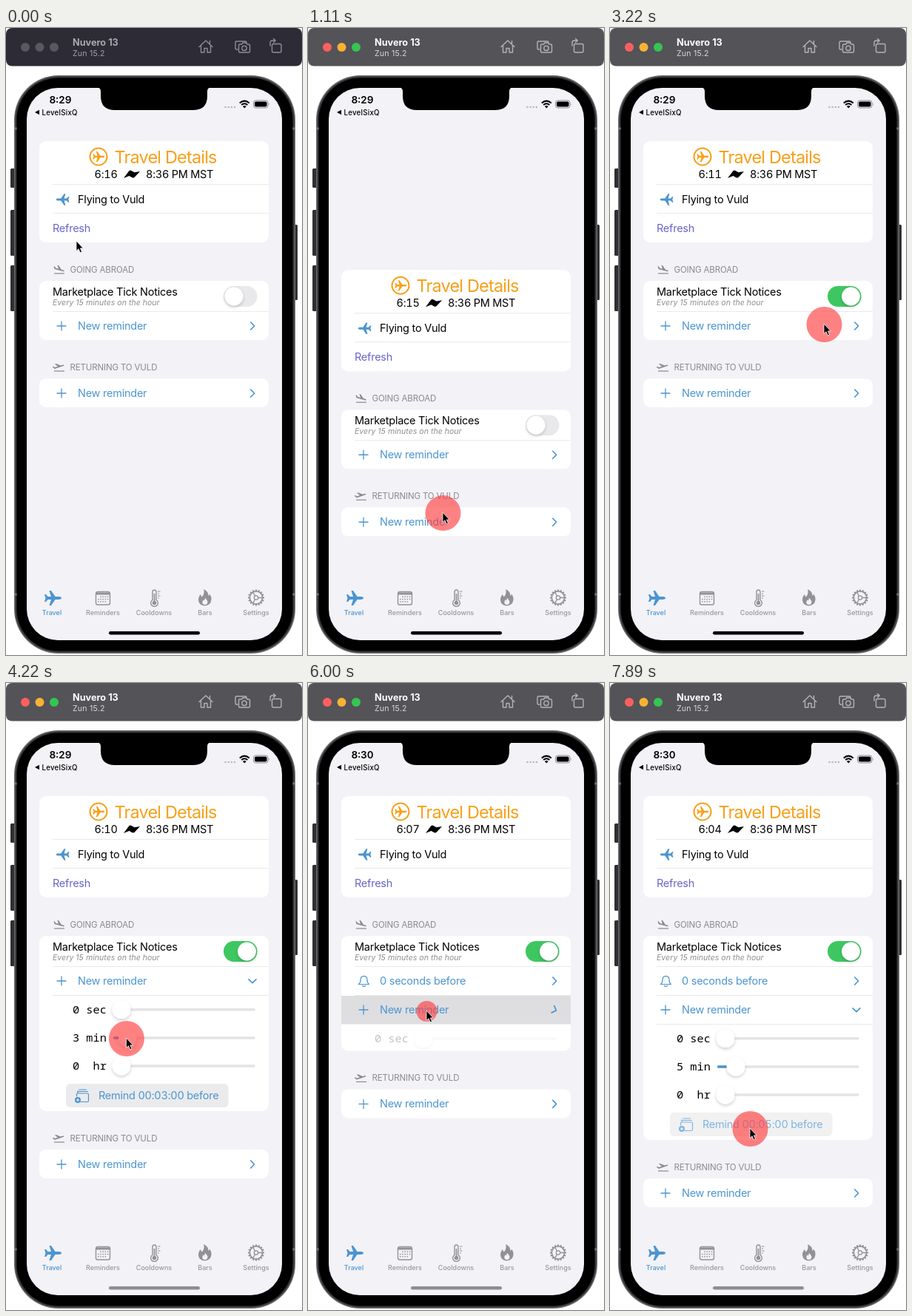
Write an HTML page that moves like this. It is 400x848 px and loops after 8 s.

```html
<!DOCTYPE html>
<html lang="en">
<head>
<meta charset="utf-8">
<title>Travel reminders</title>
<style>
html, body { margin: 0; width: 100%; height: 100%; overflow: hidden; background: #fff; }
svg { display: block; width: 400px; height: 848px; font-family: Inter, Roboto, sans-serif; }
text { white-space: pre; }
.body { font-size: 14.5px; letter-spacing: -.25px; }
.head { font-size: 11.5px; letter-spacing: -.15px; fill: #8a8a8e; }
.tab { font-size: 9px; font-weight: 500; text-anchor: middle; }
.mono { font: 15.3px "Noto Sans Mono", "DejaVu Sans Mono", monospace; }
.num { font-feature-settings: "tnum"; }
.blue { fill: #4c95d0; }
.line { fill: none; stroke-linecap: round; stroke-linejoin: round; }
.sep { stroke: #e9e9ec; stroke-width: 1; }
.card { fill: #fff; }
</style>
</head>
<body>
<svg id="stage" viewBox="0 0 400 848">
  <defs>
    <path id="plane" d="M12 0C12-1.4 9.6-1.9 8-1.9H3.5L-2-10H-4.5L-2-1.9H-6.5L-9-5H-11L-9.5 0L-11 5H-9L-6.5 1.9H-2L-4.5 10H-2L3.5 1.9H8C9.6 1.9 12 1.4 12 0Z"/>
    <path id="jet" d="M-7-5.5l1.5.4 1 2.2 4 1.1-1.6-5 1.8.5 3.6 5.6 3.3.9c1.2.5.9 1.8-.5 1.5L-6-1.5z"/>
    <path id="plus" class="line" d="M-6 0H6M0-6V6" stroke="#4c95d0" stroke-width="1.3"/>
    <path id="chev" class="line" d="M-2.2-5L2.6 0L-2.2 5" stroke="#4c95d0" stroke-width="1.7"/>
    <filter id="soft" x="-50%" y="-50%" width="200%" height="200%">
      <feDropShadow dx="0" dy="2" stdDeviation="2.2" flood-color="#000" flood-opacity=".2"/>
    </filter>
    <clipPath id="screen"><rect x="28" y="81" width="345" height="747" rx="42"/></clipPath>
    <clipPath id="fold"><rect id="foldBox" x="45" y="342" width="310" height="80" rx="9"/></clipPath>
  </defs>

  <!-- window bar -->
  <rect id="bar" width="400" height="51.5" rx="8"/>
  <g id="lights"><circle cx="26" cy="26" r="6"/><circle cx="45.5" cy="26" r="6"/><circle cx="65" cy="26" r="6"/></g>
  <text id="device" x="90" y="24" font-size="12.7" font-weight="700">Nuvero 13</text>
  <text id="system" x="90" y="38" font-size="10.6" letter-spacing=".2">Zun 15.2</text>
  <g id="tools" class="line" stroke-width="1.4">
    <path d="M261 25.5L270 17L279 25.5M263.500 24V33H268V27.500H272V33H276.500V24M275.500 21V17.500"/>
    <path d="M313 29H311.500Q310 29 310 27.500V19.500Q310 18 311.500 18H323.500Q325 18 325 19.500"/>
    <path d="M316 22H318.500L320 20H324.500L326 22H328Q329.500 22 329.500 23.500V31.500Q329.500 33 328 33H316Q314.500 33 314.500 31.500V23.500Q314.500 22 316 22Z"/>
    <circle cx="322" cy="27.300" r="3.200"/>
    <rect x="359.500" y="21.500" width="12.500" height="11.500" rx="2"/>
    <path d="M357 24V20Q357 17 360 17H364M361.500 14.500L364.200 17L361.500 19.500"/>
  </g>

  <!-- phone -->
  <g fill="#2f2f31">
    <rect x="6" y="190" width="7" height="26" rx="1.500"/><rect x="6" y="246" width="7" height="62" rx="1.500"/>
    <rect x="6" y="321" width="7" height="62" rx="1.500"/><rect x="388" y="266" width="6" height="102" rx="1.500"/>
  </g>
  <rect x="11" y="64" width="380" height="782" rx="60" fill="#69696b"/>
  <rect x="12.500" y="65.500" width="377" height="779" rx="58.500" fill="#343436"/>
  <rect x="14.500" y="67.500" width="373" height="775" rx="56.500"/>
  <path d="M11 136H14.500M11 766H14.500M387.500 136H391M387.500 766H391" stroke="#77777a" stroke-width="3"/>
  <rect x="28" y="81" width="345" height="747" rx="42" fill="#f2f2f7"/>

  <g clip-path="url(#screen)">
    <g id="list">
      <rect class="card" x="45" y="153" width="310" height="137" rx="9"/>
      <circle cx="125" cy="174" r="11.500" fill="none" stroke="#f7a01b" stroke-width="2"/>
      <use href="#plane" transform="translate(125 174) scale(.7)" fill="#f7a01b"/>
      <text x="146.500" y="182.500" font-size="23.500" letter-spacing="-.83" fill="#f7a01b">Travel Details</text>
      <text id="timer" class="body num" x="119.500" y="203"></text>
      <path d="M159 203L166.500 193Q168 192 170 193.300L173.500 195.300L181 194L173.500 202Q172 203.200 170 202L166.500 200Z"/>
      <text class="body num" x="189" y="203">8:36 PM MST</text>
      <path class="sep" d="M63 211.500H355M63 250.500H355"/>
      <use href="#plane" class="blue" transform="translate(77 232) scale(-.77 .77)"/>
      <text class="body" x="97" y="237">Flying to Vuld</text>
      <text class="body" x="63" y="276" fill="#6765c9">Refresh</text>

      <use href="#jet" transform="translate(71.500 327.500)" fill="#8a8a8e"/>
      <path d="M65 332H79" stroke="#8a8a8e" stroke-width="1.200"/>
      <text class="head" x="86.500" y="331">GOING ABROAD</text>

      <g clip-path="url(#fold)">
        <rect class="card" x="45" y="342" width="310" height="400"/>
        <text class="body" x="63" y="362">Marketplace Tick Notices</text>
        <text x="63" y="375" font-size="10.600" font-style="italic" fill="#8f8f93">Every 15 minutes on the hour</text>
        <rect id="track" x="294" y="349" width="45.500" height="28" rx="14"/>
        <circle id="knob" cy="363" r="12.400" fill="#fff" filter="url(#soft)"/>
        <path class="sep" d="M63 383.500H355"/>
        <g id="saved">
          <g class="line" stroke="#4c95d0" stroke-width="1.200">
            <path d="M68.500 407.500Q71 405.500 71 401.500Q71 396.500 75.500 396.300Q80 396.500 80 401.500Q80 405.500 82.500 407.500ZM73.500 409.500Q75.500 411.300 77.500 409.500"/>
          </g>
          <text class="body blue" x="97" y="408">0 seconds before</text>
          <use href="#chev" x="333" y="403"/>
          <path class="sep" d="M63 422.500H355"/>
        </g>
        <g id="adder">
          <rect id="glow" x="45" y="-19" width="310" height="38.500" fill="#d6d6da"/>
          <use href="#plus" x="75"/>
          <text class="body blue" x="97" y="5">New reminder</text>
          <use id="turn" href="#chev"/>
          <g id="panel">
            <path class="sep" d="M63 19.500H355"/>
            <g id="sliders"></g>
            <g id="remind">
              <rect x="81" y="139" width="219.500" height="32" rx="6" fill="#ebebed"/>
              <g class="line" stroke="#4c95d0" stroke-width="1.200">
                <path d="M97 149V152Q95.500 152 95.500 153.500V156M101 163.500H110Q111.500 163.500 111.500 162V153.500Q111.500 152 110 152H97M96.500 149.500H110.500M98.500 147H108.500"/>
              </g>
              <circle class="blue" cx="97" cy="161" r="4"/>
              <path d="M95 161H99M97 159V163" stroke="#fff" stroke-width="1"/>
              <text id="label" class="body blue num" x="125" y="160"></text>
            </g>
          </g>
        </g>
      </g>

      <g id="back">
        <use href="#jet" transform="translate(71.500 459) rotate(-34)" fill="#8a8a8e"/>
        <path d="M65 464H79" stroke="#8a8a8e" stroke-width="1.200"/>
        <text class="head" x="86.500" y="463">RETURNING TO VULD</text>
        <rect class="card" x="45" y="474" width="310" height="39" rx="9"/>
        <use href="#plus" x="75" y="494"/>
        <text class="body blue" x="97" y="499">New reminder</text>
        <use href="#chev" x="333" y="494"/>
      </g>
    </g>

    <!-- status -->
    <text id="clock" class="num" x="58.500" y="101.500" font-size="13.600" font-weight="600"></text>
    <path d="M39 114L45 110.800V117.200Z"/>
    <text x="48.500" y="117.500" font-size="9.700" font-weight="500" letter-spacing=".25">LevelSixQ</text>
    <path class="line" d="M296.500 107H309" stroke="#b9b9be" stroke-width="2.600" stroke-dasharray="0 4.150"/>
    <g class="line" stroke="#000" stroke-width="2" style="stroke-linecap:butt">
      <path d="M315.800 101.500Q322.300 95.700 328.800 101.500M318.200 104Q322.300 100.400 326.400 104"/>
    </g>
    <path d="M322.300 108.500L319.900 105.900Q322.300 103.900 324.700 105.900Z"/>
    <rect x="334.500" y="98" width="19.500" height="10" rx="3" fill="none" stroke="#8a8a8e"/>
    <rect x="336" y="99.500" width="16.500" height="7" rx="1.800"/>
    <path d="M355.500 101.500Q357 103 355.500 104.800Z" fill="#8a8a8e"/>

    <!-- tabs -->
    <use href="#plane" class="blue" transform="translate(63 771)"/>
    <g id="icons" fill="#929296" stroke="#929296"></g>
    <g id="tabs"></g>
    <rect id="home" x="139" y="816" width="123" height="4.500" rx="2.250"/>
  </g>
  <path d="M124 80.500Q128 81 128 86V92Q128 111 147 111H253Q272 111 272 92V86Q272 81 276 80.500Z"/>

  <circle id="touch" fill="#ff3c3e" fill-opacity=".64"/>
  <path id="mouse" d="M0 0V13.500L3.100 10.700L5.200 15.800L7.500 14.800L5.400 9.900H9.300Z" stroke="#fff" stroke-width=".8"/>
</svg>

<script>
const $ = id => document.getElementById(id);
const set = (id, attrs) => { for (const k in attrs) $(id).setAttribute(k, attrs[k]); };
const clamp = v => Math.max(0, Math.min(1, v));
const ease = v => v * v * (3 - 2 * v);
const ramp = (t, a, b) => ease(clamp((t - a) / (b - a)));
const pad = n => String(n).padStart(2, "0");
const LOOP = 8000, STEP = 1000 / 9;

// time, x, y of the pointer
const path = [
  [0, 95, 288], [220, 95, 288], [560, 193, 244], [780, 193, 244],
  [890, 190, 430], [1000, 186, 580], [1110, 182, 655], [1220, 178, 667],
  [1330, 172, 650], [1560, 167, 611], [1670, 200, 520], [1780, 260, 440],
  [2060, 333, 366], [2520, 333, 366], [2670, 322, 380], [2960, 289, 400],
  [3640, 289, 400], [3780, 200, 455], [3890, 153, 480], [4000, 153, 480],
  [4330, 167, 480], [4560, 153, 480], [4780, 165, 602], [4890, 163, 575],
  [5000, 162, 559], [5330, 162, 559], [5620, 160, 443], [6110, 160, 443],
  [6450, 153, 505], [6560, 153, 514], [6780, 153, 514], [7110, 167, 515],
  [7210, 172, 585], [7330, 172, 585], [7440, 182, 630], [7550, 188, 640],
  [7670, 189, 602], [8000, 189, 602]
];
const taps = [[540, 1220], [2090, 2420], [2990, 3240], [3740, 4580], [4880, 5130], [5660, 5900], [6520, 7110], [7640, 8200]];
const minuteKeys = [[0, 0], [4000, 0], [4330, 5], [4560, 0], [6780, 0], [7110, 5], [8000, 5]];

function along(keys, t) {
  let i = 1;
  while (i < keys.length - 1 && keys[i][0] < t) i++;
  const a = keys[i - 1], b = keys[i], f = clamp((t - a[0]) / (b[0] - a[0]));
  return a.slice(1).map((v, n) => v + (b[n + 1] - v) * f);
}

const touchSize = t => Math.max(...taps.map(([down, up]) =>
  t < up ? clamp((t - down) / 210) : 1 - clamp((t - up) / 240)));

function pull(t) {
  const drag = Math.max(0, along(path, Math.min(t, 1220))[1] - 244);
  if (t < 780) return 0;
  const stretch = 760 * (1 - 1 / (drag * .55 / 760 + 1));
  return stretch * (1 - clamp((t - 1220) / 320)) ** 3;
}

function build() {
  $("sliders").innerHTML = ["sec", "min", " hr"].map((unit, i) => {
    const y = 38.7 + i * 38.2;
    return `<text id="unit${i}" class="mono" x="90" y="${y + 5}">0 ${unit}</text>
      <path class="line" d="M146.500 ${y}H335" stroke="#e4e4e6" stroke-width="3.500"/>
      <path id="fill${i}" class="line" d="" stroke="#4c95d0" stroke-width="3.500"/>
      <circle id="grip${i}" cx="156" cy="${y}" r="12.400" fill="#fff" filter="url(#soft)"/>`;
  }).join("");

  $("tabs").innerHTML = ["Travel", "Reminders", "Cooldowns", "Bars", "Settings"].map((s, i) =>
    `<text class="tab" x="${62 + i * 69}" y="794" fill="${i ? "#98989c" : "#4c95d0"}">${s}</text>`).join("");

  let dots = "", teeth = "";
  for (let i = 1; i < 14; i++)
    dots += `<rect x="${124 + i % 5 * 3.2}" y="${768.5 + Math.floor(i / 5) * 3.3}" width="1.500" height="1.500" stroke="none"/>`;
  for (let i = 0; i < 16; i++)
    teeth += `<path d="M338 759.500V762" stroke-width="2.200" transform="rotate(${i * 22.5} 338 770.500)"/>`;
  $("icons").innerHTML = `
    <rect x="121.500" y="762.500" width="19" height="17.500" rx="2.500" fill="none" stroke-width="1.400"/>
    <path d="M121.500 765H140.500" stroke-width="3"/>${dots}
    <path d="M198 773.500V763Q198 760 200.500 760Q203 760 203 763V773.500A4.800 4.800 0 1 1 198 773.500Z" fill="none" stroke-width="1.400"/>
    <circle cx="200.500" cy="777.500" r="2.700" stroke="none"/>
    <path d="M200.500 777V765" stroke-width="1.700"/>
    <path d="M205 762H208.500M205 765H207M205 768H208.500M205 771H207" stroke-width="1"/>
    <path d="M267 759Q274 762 273.500 768Q275 767 275 765.500Q278 769 277.500 773.500Q276.500 781 268.500 781.500Q260.500 781 260 773.500Q260 769 263 766Q263.300 768.500 265 769.500Q269 765 267 759Z" stroke="none"/>
    <path d="M269 771Q272.500 774 272.500 776.500Q272 780 268.800 780Q265.500 780 265.300 776.500Q265.500 774.500 267 773.300L268 774.500Z" fill="#f2f2f7" stroke="none"/>
    <circle cx="338" cy="770.500" r="8.600" fill="none" stroke-width="1.600"/>
    <circle cx="338" cy="770.500" r="2.700" fill="none" stroke-width="1.200"/>
    <path d="M340.700 770.500H346.500M336.600 768.200L333.700 763.100M336.600 772.800L333.700 777.900" stroke-width="1.300"/>${teeth}`;
}

function drawBar(active) {
  set("bar", { fill: active ? "#545358" : "#2d2b36" });
  set("device", { fill: active ? "#fff" : "#a9a7ad" });
  set("system", { fill: active ? "#d8d7da" : "#a3a1a8" });
  set("tools", { stroke: active ? "#b3b2b6" : "#8e8c95" });
  ["#fe5f5f", "#f9b233", "#35c552"].forEach((c, i) =>
    $("lights").children[i].setAttribute("fill", active ? c : "#5a585f"));
}

function draw(t) {
  const [x, y] = along(path, t);
  const size = touchSize(t);
  const on = ramp(t, 2400, 2660);
  const saved = ramp(t, 5130, 5300);
  const open = t < 5100 ? ramp(t, 3240, 3560) : t < 5500 ? 1 - saved : ramp(t, 5900, 6220);
  const minutes = Math.round(along(minuteKeys, t)[0]);
  const left = 376 - Math.floor(t * .0015 + .25);

  drawBar(t >= 550);
  $("clock").textContent = t < 5050 ? "8:29" : "8:30";
  $("timer").textContent = `${Math.floor(left / 60)}:${pad(left % 60)}`;
  set("list", { transform: `translate(0 ${pull(t)})` });

  set("track", { fill: `rgb(${233 - 171 * on},${233 - 34 * on},${235 - 138 * on})` });
  set("knob", { cx: 308 + 17.5 * on });
  set("saved", { opacity: saved });
  set("adder", { transform: `translate(0 ${403 + 39 * saved})` });
  set("glow", { opacity: t > 5840 && t < 6100 ? .8 : 0 });
  set("turn", { transform: `translate(333 0) rotate(${90 * open})` });
  set("panel", { opacity: open });
  set("foldBox", { height: 80 + 39 * saved + 157 * open });
  set("back", { transform: `translate(0 ${39 * saved + 157 * open})` });

  const grip = 156 + minutes * 2.8;
  $("unit1").textContent = minutes + " min";
  set("grip1", { cx: grip });
  set("fill1", { d: minutes ? `M146.500 76.900H${grip}` : "" });
  $("label").textContent = `Remind 00:${pad(minutes)}:00 before`;
  const held = (t > 4950 && t < 5130) || t > 7700;
  set("remind", { opacity: held ? .7 : 1 });

  set("home", { fill: t < 3300 ? "#000" : "#8e8e92" });
  set("touch", { cx: x + .5, cy: y + 1, r: 24 * size });
  set("mouse", { transform: `translate(${x} ${y})` });
}

build();
const start = performance.now();
function tick() {
  const t = (performance.now() - start) % LOOP;
  draw(Math.floor((t + 5) / STEP) % 72 * STEP);
  requestAnimationFrame(tick);
}
tick();
</script>
</body>
</html>
```
